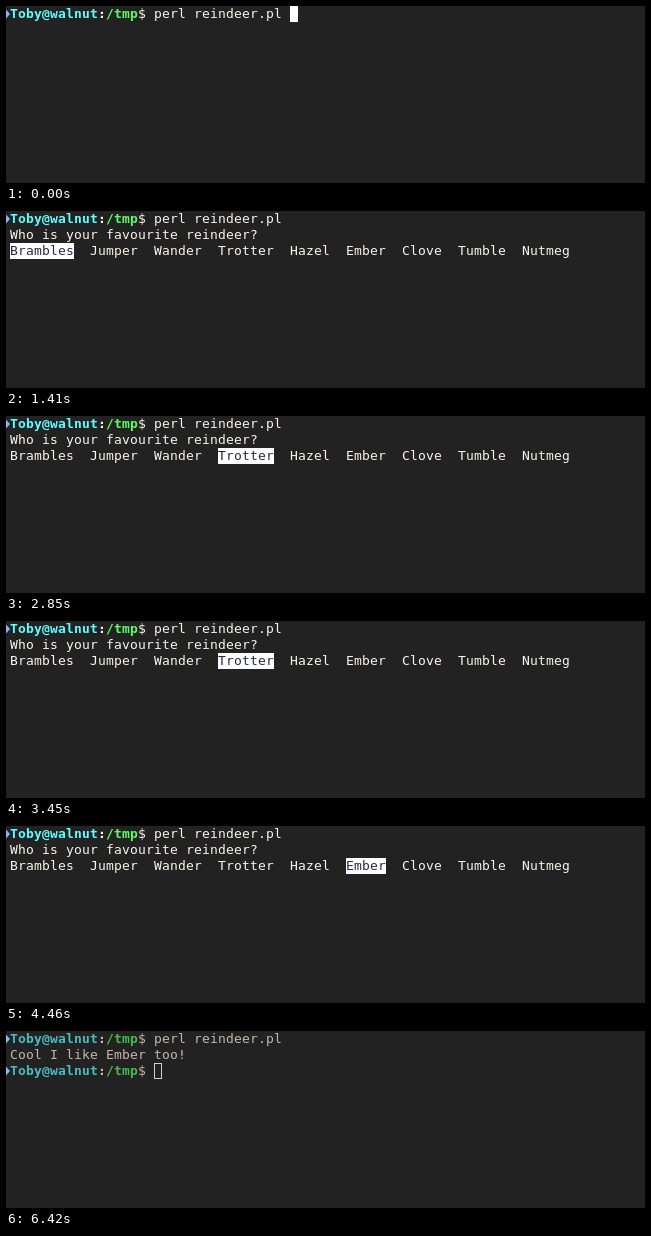
These frames come from a looping animation (639x177 px, 6490 ms). An HTML page with a canvas:

```html
<!DOCTYPE html>
<html lang="en">
<head>
<meta charset="utf-8">
<title>Terminal menu</title>
<style>
  html, body { margin: 0; width: 100%; height: 100%; overflow: hidden; background: #222; }
  canvas { display: block; }
</style>
</head>
<body>
<canvas id="screen" width="639" height="177"></canvas>
<script>
const ctx = document.getElementById('screen').getContext('2d');
const LOOP = 6490;
const CELL = { w: 8, h: 16, left: 4, baseline: 12 };
const FONT = '13px "DejaVu Sans Mono", monospace';
const ARROW = '#84b9f8';
const LIT = { text: '#fff5e9', host: '#60fdff', path: '#60fa68', cursor: '#ffffff' };
const DIM = { text: '#c8b8a8', host: '#48bdbf', path: '#48b94e', cursor: '#d0d0d0' };

const NAMES = ['Brambles', 'Jumper', 'Wander', 'Trotter', 'Hazel', 'Ember', 'Clove', 'Tumble', 'Nutmeg'];
const PROMPT_LENGTH = 18;
const COMMAND = 'perl reindeer.pl';

// Start time, screen, selected name
const STEPS = [
  [0, 'command'],
  [1350, 'launch'],
  [1410, 'menu', 0],
  [2550, 'menu', 1],
  [2730, 'menu', 2],
  [2850, 'menu', 3],
  [3030, 'menu', 4],
  [3450, 'menu', 3],
  [3860, 'menu', 2],
  [4160, 'menu', 3],
  [4340, 'menu', 4],
  [4460, 'menu', 5],
  [5060, 'answer'],
  [6420, 'blurred']
];

const cellX = col => CELL.left + col * CELL.w;

function write(row, col, text, color, bold = false) {
  ctx.font = (bold ? 'bold ' : '') + FONT;
  ctx.fillStyle = color;
  [...text].forEach((ch, i) => ctx.fillText(ch, cellX(col + i), row * CELL.h + CELL.baseline));
  return col + text.length;
}

function block(row, col, length, color) {
  ctx.fillStyle = color;
  ctx.fillRect(cellX(col), row * CELL.h, length * CELL.w, CELL.h);
}

function hollowCursor(row, col, color) {
  ctx.strokeStyle = color;
  ctx.lineWidth = 1;
  ctx.strokeRect(cellX(col) + 0.5, row * CELL.h + 0.5, CELL.w - 1, CELL.h - 1);
}

function prompt(row, colors) {
  const y = row * CELL.h + 8;
  ctx.fillStyle = ARROW;
  ctx.beginPath();
  ctx.moveTo(0, y - 4.5);
  ctx.lineTo(4, y);
  ctx.lineTo(0, y + 4.5);
  ctx.fill();
  let col = write(row, 0, 'Toby@walnut', colors.host, true);
  col = write(row, col, ':', colors.text, true);
  col = write(row, col, '/tmp', colors.path, true);
  write(row, col, '$', colors.text);
}

function menu(selected) {
  write(1, 0, 'Who is your favourite reindeer?', LIT.text);
  let col = 0;
  NAMES.forEach((name, i) => {
    if (i === selected) block(2, col, name.length, '#ffffff');
    write(2, col, name, i === selected ? '#26264a' : LIT.text);
    col += name.length + 2;
  });
}

function draw([, screen, selected]) {
  const colors = screen === 'blurred' ? DIM : LIT;
  ctx.fillStyle = '#222222';
  ctx.fillRect(0, 0, 639, 177);
  prompt(0, colors);
  const end = write(0, PROMPT_LENGTH, COMMAND, colors.text);

  if (screen === 'command') block(0, end + 1, 1, colors.cursor);
  else if (screen === 'launch') block(1, 0, 1, colors.cursor);
  else if (screen === 'menu') menu(selected);
  else {
    write(1, 0, `Cool I like ${NAMES[5]} too!`, colors.text);
    prompt(2, colors);
    if (screen === 'answer') block(2, PROMPT_LENGTH, 1, colors.cursor);
    else hollowCursor(2, PROMPT_LENGTH, colors.cursor);
  }
}

const start = performance.now();
function frame(now) {
  const t = Math.max(0, now - start) % LOOP;
  draw(STEPS.findLast(step => step[0] <= t));
  requestAnimationFrame(frame);
}
frame(start);
</script>
</body>
</html>
```
